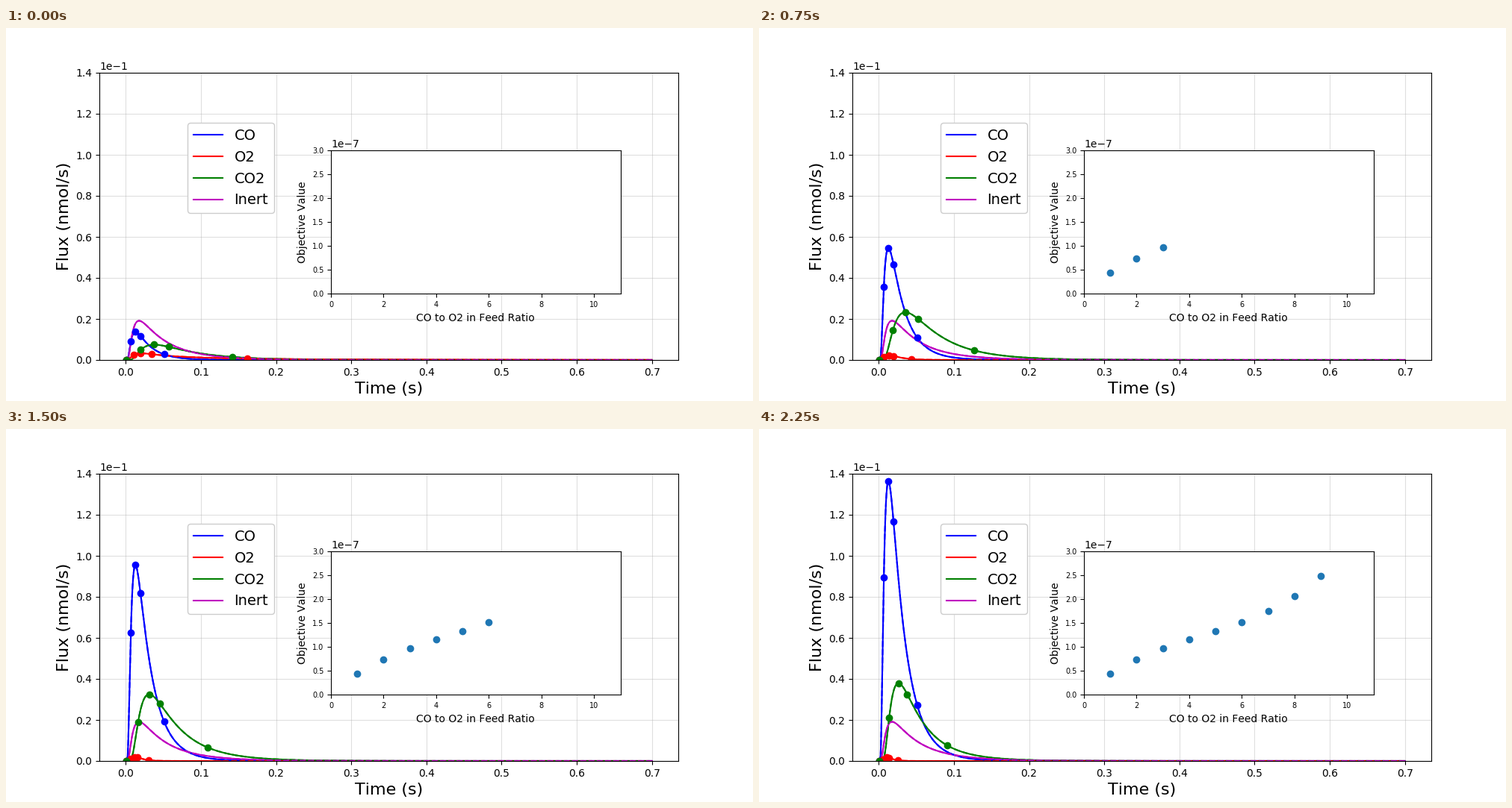
Recreate the animation shown at these times as a matplotlib script. Size 1000 by 500 pixels, loop 3.25 s.

```python
import numpy as np
import matplotlib.pyplot as plt
from matplotlib.animation import FuncAnimation

STEPS = 10          # feed ratios shown
HOLD = 3            # extra ticks on the last one

plt.rcParams["text.kerning_factor"] = 6
t = np.linspace(1e-4, .7, 7000)


def pulse(peak, mid, power, rate):
    """Gas pulse with its maximum at time mid and a tail decaying at rate."""
    x = t / mid
    loss = rate * mid
    rise = power + loss
    return peak * np.exp(-power * np.log(x) - rise * (1 / x - 1) - loss * (x - 1))


def curves(ratio):
    fade = ratio ** -.26
    co = pulse(.01364 * ratio, .0129, .9, 36.4)
    o2 = pulse(.0033 * fade, .0195 * fade, 1, 3 + 17 * (ratio - 1))
    co2 = pulse(.0456 * (1 - np.exp(-ratio / 5.6)),
                .038 / (1 + (ratio / 15) ** 2),
                .5 + .11 * ratio, 16.5)
    inert = pulse(.0191, .0178, .8, 17)
    return co, o2, co2, inert


def marks(curve):
    """Points at the start, on the rise, at the peak, on the fall, in the tail."""
    top = curve.argmax()
    falls = [np.flatnonzero(curve > part * curve[top])[-1] for part in (.855, .2)]
    times = [.001, .53 * t[top], t[top], *t[falls]]
    return np.column_stack([times, np.interp(times, t, curve)])


def objective(ratio):
    return 1e-7 * np.polyval([.005, .008, .175, 1.33], ratio - 5)


def sci(axes, xlabel, ylabel, size):
    axes.set_xlabel(xlabel, fontsize=size)
    axes.set_ylabel(ylabel, fontsize=size)
    axes.ticklabel_format(style="sci", axis="y", scilimits=(0, 0))


fig = plt.figure(figsize=(10, 5), dpi=100)
ax = fig.add_axes([.125, .11, .775, .77])
ax.set(xlim=(-.035, .735), ylim=(0, .14))
sci(ax, "Time (s)", "Flux (nmol/s)", 16)
ax.grid(True, alpha=.4)

species = [("CO", "b"), ("O2", "r"), ("CO2", "g"), ("Inert", "m")]
solid = [ax.plot([], [], color=c, label=name)[0] for name, c in species]
dashed = [ax.plot([], [], "--", color=c)[0] for _, c in species]
dots = [ax.scatter([], [], color=c, zorder=2) for _, c in species[:3]]
ax.legend(loc="upper left", bbox_to_anchor=(.14, .85), fontsize=14, framealpha=1)

inset = fig.add_axes([.435, .2875, .3875, .385])
inset.set(xlim=(0, 11), ylim=(0, 3e-7), xticks=range(0, 11, 2))
sci(inset, "CO to O2 in Feed Ratio", "Objective Value", 10)
inset.tick_params(labelsize=7)
score = inset.scatter([], [], color="C0")


def draw(tick):
    ratio = min(tick + 1, STEPS)
    flux = curves(ratio)
    for curve, full, dash in zip(flux, solid, dashed):
        full.set_data(t, curve)
        dash.set_data(t, curve)
    for curve, dot in zip(flux, dots):
        dot.set_offsets(marks(curve))
    done = np.arange(1, ratio)
    score.set_offsets(np.column_stack([done, objective(done)]))
    return solid + dashed + dots + [score]


anim = FuncAnimation(fig, draw, frames=STEPS + HOLD, interval=250,
                     repeat=True, repeat_delay=0, blit=False)
plt.show()
```
